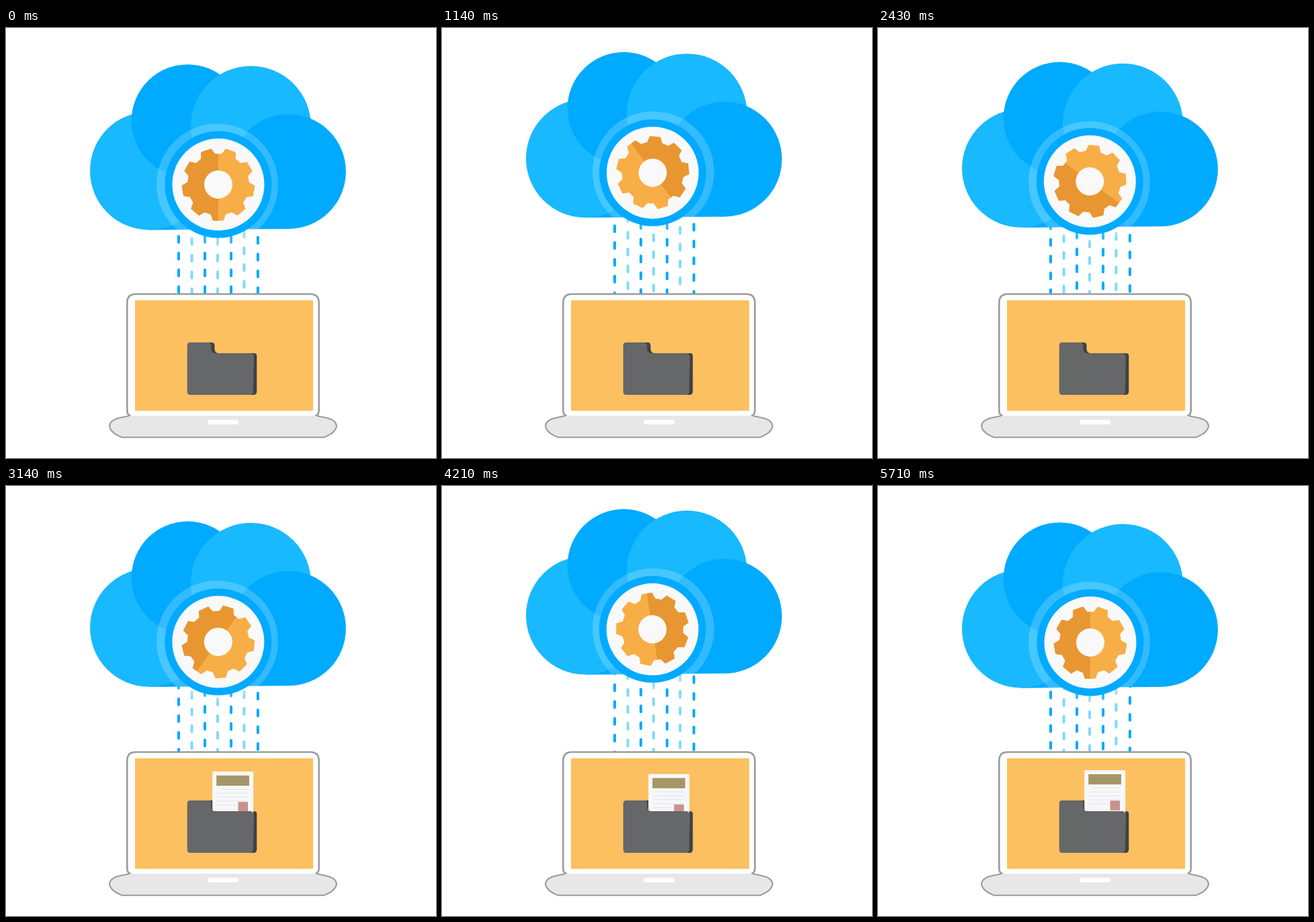
These frames come from a looping animation (640x640 px, 5780 ms). An HTML page:

```html
<!DOCTYPE html>
<html lang="en">
<head>
<meta charset="utf-8">
<title>Cloud sync</title>
<style>
  html, body { margin: 0; height: 100%; overflow: hidden; background: #fff; }
  svg { display: block; width: 100vw; height: 100vh; }
</style>
</head>
<body>
<svg viewBox="0 0 640 640">
  <defs>
    <clipPath id="aboveFold"><path d="M300 400H369V507H300Z"/></clipPath>
  </defs>

  <g id="streams" fill="none" stroke-width="4" stroke-linecap="round"></g>

  <g id="cloud">
    <path d="M213 200V300.7L420 299V200Z" fill="#00aaff"/>
    <circle cx="213" cy="212.5" r="88" fill="#18b9ff"/>
    <circle cx="270.5" cy="138" r="83.8" fill="#00aaff"/>
    <circle cx="364.5" cy="146" r="89.5" fill="#18b9ff"/>
    <circle cx="420.5" cy="213.6" r="85.4" fill="#00aaff"/>
    <circle cx="314.5" cy="232.8" r="90.5" fill="#fff" opacity=".2"/>
  </g>

  <g id="badge">
    <circle r="79.5" fill="#00aaff"/>
    <circle r="68.5" fill="#f9f9f9"/>
    <g id="gear">
      <path id="gearLight" fill="#f8ae46"/>
      <path id="gearDark" fill="#e89632"/>
      <circle r="21" fill="#f9f9f9"/>
    </g>
  </g>

  <g id="laptop">
    <path d="M186 577.5Q180.300 576 180.300 569V409Q180.300 396 193.300 396H453Q465.700 396 465.700 409V569Q465.700 576 460 577.500" fill="#fff" stroke="#9b9b9b" stroke-width="2.600"/>
    <path d="M192 405.300H457.200V569.800H192Z" fill="#fdc060"/>
    <path d="M184 577H462L480 581Q492 584.500 492 593Q490 603 473 609.300H173Q156 603 154 593Q154 584.500 166 581Z" fill="#e7e7e7"/>
    <path d="M184 577L166 581Q154 584.500 154 593Q156 603 173 609.300H473Q490 603 492 593Q492 584.500 480 581L462 577" fill="none" stroke="#9b9b9b" stroke-width="2"/>
    <rect x="300" y="583" width="46" height="7" rx="3.500" fill="#fff"/>
  </g>

  <g id="folder">
    <path d="M280 468H306Q310.500 468 310.500 473V478Q311 484 317 484H369Q373.300 484 373.300 488V541Q373.300 546 368 546H280Z" fill="#3e4244"/>
    <g clip-path="url(#aboveFold)">
      <g id="sheet">
        <rect x="307.200" width="61" height="84" rx="1" fill="#f6f7f9"/>
        <rect x="313.200" y="6" width="48.700" height="15.200" fill="#a69567"/>
        <path d="M320 26.500H360M314 32.500H360M314 38H360M314 44H360M314 50H343" stroke="#e2e3e8"/>
        <rect x="345.500" y="45.300" width="14.500" height="14.500" fill="#c8928c"/>
      </g>
    </g>
    <path d="M274 468H301Q305.300 468 305.300 473V478Q306 484 312 484H364Q368.300 484.500 368.700 489L368 541Q368 546 363 546H274Q269.700 546 269.700 541V473Q269.700 468 274 468Z" fill="#666769"/>
  </g>
</svg>

<script>
const LOOP = 5780, SWING = 2855, DASH_STEP = 25;
const TOP = 423, BOTTOM = 507;
const $ = id => document.getElementById(id);

// Columns of dashes: x, starting offset, pixels per ms (blue falls, pale rises)
const streams = [
  [257, 8, .0738], [276.6, 11, -.0736], [296, 8, .0694], [315, 11, -.0704],
  [335, 8, .0696], [354.4, 0, -.0704], [374.9, 9.5, .0706]
].map(([x, start, speed]) => {
  const path = document.createElementNS("http://www.w3.org/2000/svg", "path");
  path.setAttribute("d", `M${x} 225V405`);
  path.setAttribute("stroke", speed > 0 ? "#00aaff" : "#80daf9");
  path.setAttribute("stroke-dasharray", `9 ${DASH_STEP - 9}`);
  $("streams").append(path);
  return { path, start, speed };
});

function gearOutline(from, teeth) {
  const points = [];
  const add = (radius, degrees) => {
    const a = degrees * Math.PI / 180;
    points.push(`${(radius * Math.cos(a)).toFixed(2)} ${(radius * Math.sin(a)).toFixed(2)}`);
  };
  for (let i = 0; i < teeth; i++) {
    const mid = from + i * 40;
    add(46, mid - 14);
    add(54.5, mid - 8.3);
    add(54.5, mid + 8.3);
    add(46, mid + 14);
  }
  return points;
}
$("gearLight").setAttribute("d", `M${gearOutline(90, 9).join("L")}Z`);
// Left half: from the bottom tooth's middle to the valley at the top
$("gearDark").setAttribute("d",
  `M0 0L0 54L${gearOutline(90, 5).slice(2).join("L")}L0 -45.800Z`);

const easeInOut = p => {
  const a = p ** 1.75;
  return a / (a + (1 - p) ** 1.75);
};

// 0 at the lowest point, 1 at the highest
const swing = t => {
  const phase = ((t + SWING) % SWING) / SWING * 2;
  return easeInOut(phase < 1 ? phase : 2 - phase);
};

const sheetStart = [
  [0, 486], [400, TOP], [1000, 510], [1140, 488], [1750, TOP], [1910, BOTTOM]
];
function sheetY(t) {
  const next = sheetStart.findIndex(key => key[0] > t);
  if (next > 0) {
    const [t0, y0] = sheetStart[next - 1], [t1, y1] = sheetStart[next];
    return y0 + (y1 - y0) * (1 - Math.cos(Math.PI * (t - t0) / (t1 - t0))) / 2;
  }
  const turns = (Math.min(t, 5675) - 1910) / 502;
  return TOP + (BOTTOM - TOP) * (1 + Math.cos(2 * Math.PI * turns)) / 2;
}

const move = (id, value) => $(id).setAttribute("transform", value);

function draw() {
  const t = performance.now() % LOOP;
  const lift = swing(t - 60);
  move("cloud", `translate(0 ${-20 * swing(t)})`);
  move("badge", `translate(${316 - 2.8 * lift} ${233 - 20 * lift})`);
  move("gear", `rotate(${t / SWING * 360})`);
  move("sheet", `translate(0 ${sheetY(t)})`);
  for (const { path, start, speed } of streams) {
    path.setAttribute("stroke-dashoffset", -(start + 2 + speed * t) % DASH_STEP);
  }
  requestAnimationFrame(draw);
}
draw();
</script>
</body>
</html>
```
